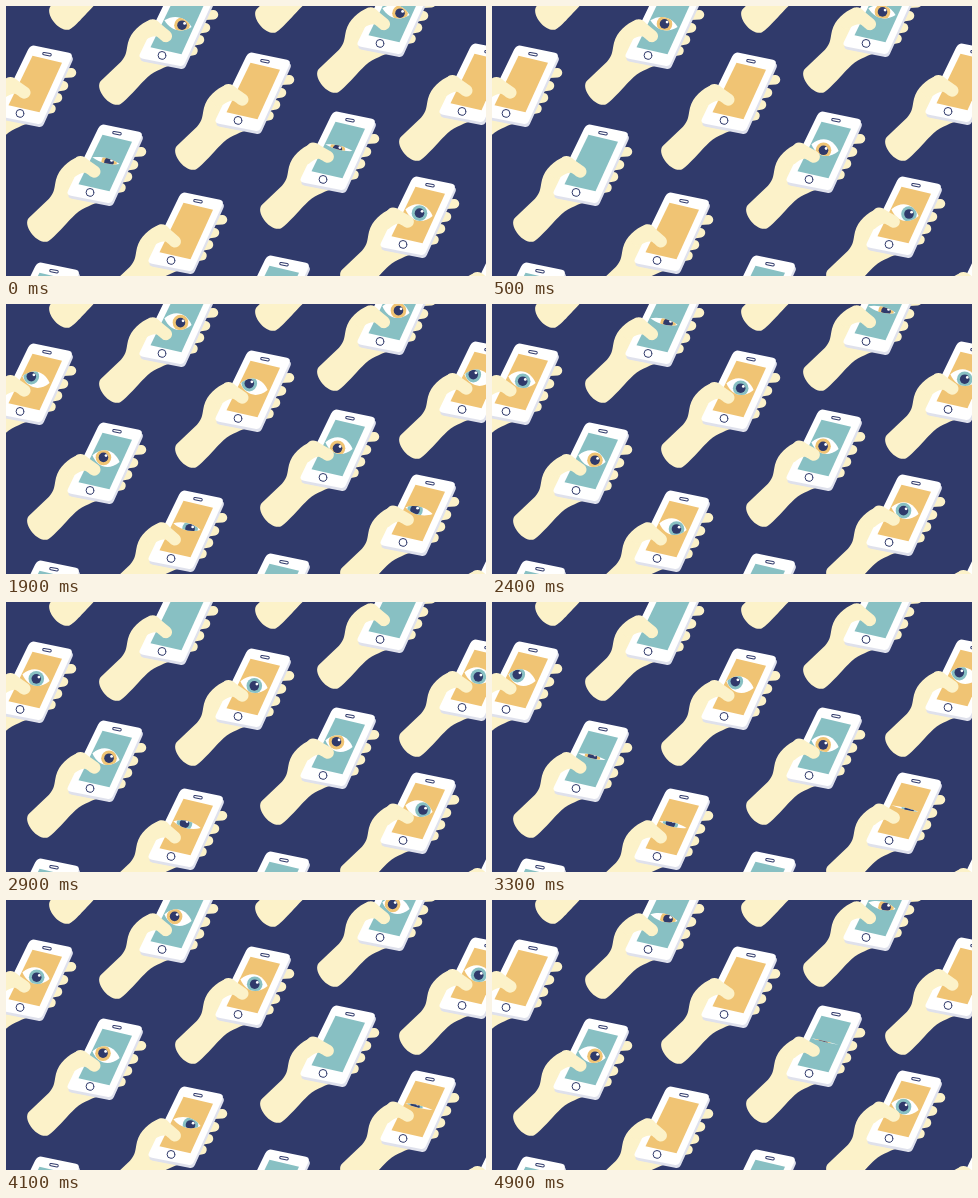
An HTML page with a canvas that plays this animation: 480 by 270 pixels, repeating every 5000 ms.

```html
<!DOCTYPE html>
<html>
<head>
<meta charset="utf-8">
<style>
html, body { margin: 0; width: 100%; height: 100%; overflow: hidden; background: #303a6b; }
canvas { display: block; }
</style>
</head>
<body>
<canvas width="480" height="270"></canvas>
<script>
const ctx = document.querySelector('canvas').getContext('2d');
const NAVY = '#303a6b', CREAM = '#fcf2c9', ORANGE = '#f0c474', TEAL = '#88c0c3';
const LOOP = 5000, STEP = 100, LID = 500;

// All shapes are relative to the phone's home button.
const arm = new Path2D('M-12-36C-22-32-31-24-34-13C-36-4-35-1-41 6L-61 25C-68 32-54 51-43 49C-37 47-22 28-14 21C-7 15 4 11 12 8L10-30Z');
const thumb = new Path2D('M-13-36C-9-38-5-36-2-33L8-26C13-22 10-15 4-15C1-15-2-19-5-20C-9-20-12-18-15-16L-22-14L-28-22Z');
const fingers = new Path2D('M34-40L51.5-41M30-26L43.5-28M26-14L37.5-16M20-3L31-5');
const body = new Path2D('M15-68L49-61Q53-60 51.5-56L23 7Q21 11 17 10L-19 3Q-24 2-22-2L8-64Q11-69 15-68Z');
const screen = new Path2D('M12.5-58L42-51L19.5-1.5L-11.5-8.5Z');

// Each eye looks to and fro around a centre, `turns` times per loop,
// furthest at time `peak`, and is shut during the spans in `shut`.
const eyes = {
  a: { back: TEAL, centre: [0, 0], swing: [4, 1.5], turns: 2, peak: -100, bend: .08,
       shut: [[850, 850], [2600, 3520], [4650, 4650]] },
  b: { back: ORANGE, centre: [-2, -.8], swing: [2.7, 2.3], turns: 3, peak: 2600, bend: 0,
       shut: [[4600, 6450]] },
  c: { back: TEAL, centre: [0, 0], swing: [3, 1.5], turns: 2, peak: 200, bend: 0,
       shut: [[190, 910], [3450, 3450]] },
  d: { back: TEAL, centre: [-2, .3], swing: [.5, 2.3], turns: 3, peak: 2000, bend: -.1,
       shut: [[3880, 4840]] },
  e: { back: ORANGE, centre: [.5, .5], swing: [3, 1.8], turns: 3, peak: 2200, bend: .1,
       shut: [[1670, 1670], [3130, 3130], [4390, 5600]] },
  f: { back: ORANGE, centre: [0, .3], swing: [4, 1], turns: 2, peak: 600, bend: -.1,
       shut: [[1650, 1650], [3400, 3980]] }
};

const phones = [
  [106, -26, 'b'], [312, -23, 'b'], [156, 49, 'a'], [374, 37, 'a'],
  [14, 107, 'b'], [232, 114, 'b'], [456, 105, 'b'], [84, 186, 'c'], [317, 173, 'd'],
  [165, 254, 'e'], [397, 238, 'f'], [21, 324, 'd'], [251, 317, 'd'], [481, 302, 'b']
];

const clamp = (v, lo, hi) => Math.min(hi, Math.max(lo, v));

// How far the lids are apart, 0 to 1
function openness(shut, t) {
  let gap = LID;
  for (const [from, to] of shut)
    for (const s of [t, t + LOOP]) gap = Math.min(gap, Math.max(from - s, s - to, 0));
  const u = gap / LID;
  return u * u * (3 - 2 * u);
}

function pupil({ centre, swing, turns, peak }, t) {
  const side = clamp(2 * Math.cos(2 * Math.PI * turns * (t - peak) / LOOP), -1, 1);
  return centre.map((c, i) => c + swing[i] * side);
}

function fill(color, path) {
  ctx.fillStyle = color;
  ctx.fill(path);
}

function disc(color, x, y, r) {
  ctx.fillStyle = color;
  ctx.beginPath();
  ctx.arc(x, y, r, 0, 7);
  ctx.fill();
}

function drawEye(eye, t) {
  const open = openness(eye.shut, t), [x, y] = pupil(eye, t), tilt = .24;
  if (open < .02) return;
  ctx.save();
  ctx.translate(16, -32);
  ctx.rotate(tilt);
  ctx.beginPath();
  ctx.moveTo(-14, 0);
  ctx.bezierCurveTo(-6, -11 * open, 6, -11 * open, 14, 0);
  ctx.bezierCurveTo(6, 11 * open, -6, 11 * open, -14, 0);
  ctx.fillStyle = '#fff';
  ctx.fill();
  ctx.clip();
  ctx.rotate(-tilt);
  disc(eye.back === TEAL ? ORANGE : TEAL, x, y, 7.8);
  disc(NAVY, x, y, 4.8);
  disc('#fff', x + 2.6, y - 1.8, 1.4);
  ctx.restore();
}

function drawPhone(x, y, eye, t) {
  ctx.save();
  ctx.translate(x, y + .7);
  fill(CREAM, arm);
  ctx.lineCap = 'round';
  ctx.strokeStyle = CREAM;
  ctx.lineWidth = 9.5;
  ctx.stroke(fingers);

  ctx.translate(1, 3);
  fill('#dfe1ec', body);
  ctx.translate(-1, -3);
  fill('#fff', body);
  fill(eye.back, screen);

  ctx.strokeStyle = NAVY;
  ctx.lineWidth = 1;
  ctx.beginPath();
  ctx.arc(0, -.3, 3.9, 0, 7);
  ctx.stroke();
  ctx.save();
  ctx.translate(27, -59.5);
  ctx.rotate(.17);
  ctx.beginPath();
  ctx.roundRect(-4.3, -1.2, 8.6, 2.4, 1.2);
  ctx.stroke();
  ctx.restore();

  drawEye(eye, t);
  ctx.translate(-14, -26);
  ctx.rotate(eye.bend);
  ctx.translate(14, 26);
  fill(CREAM, thumb);
  ctx.restore();
}

function draw(now) {
  const t = Math.floor(now % LOOP / STEP) * STEP;
  ctx.fillStyle = NAVY;
  ctx.fillRect(0, 0, 480, 270);
  for (const [x, y, kind] of phones) drawPhone(x, y, eyes[kind], t);
}

const start = performance.now();
function tick() {
  draw(performance.now() - start);
  requestAnimationFrame(tick);
}
tick();
</script>
</body>
</html>
```
